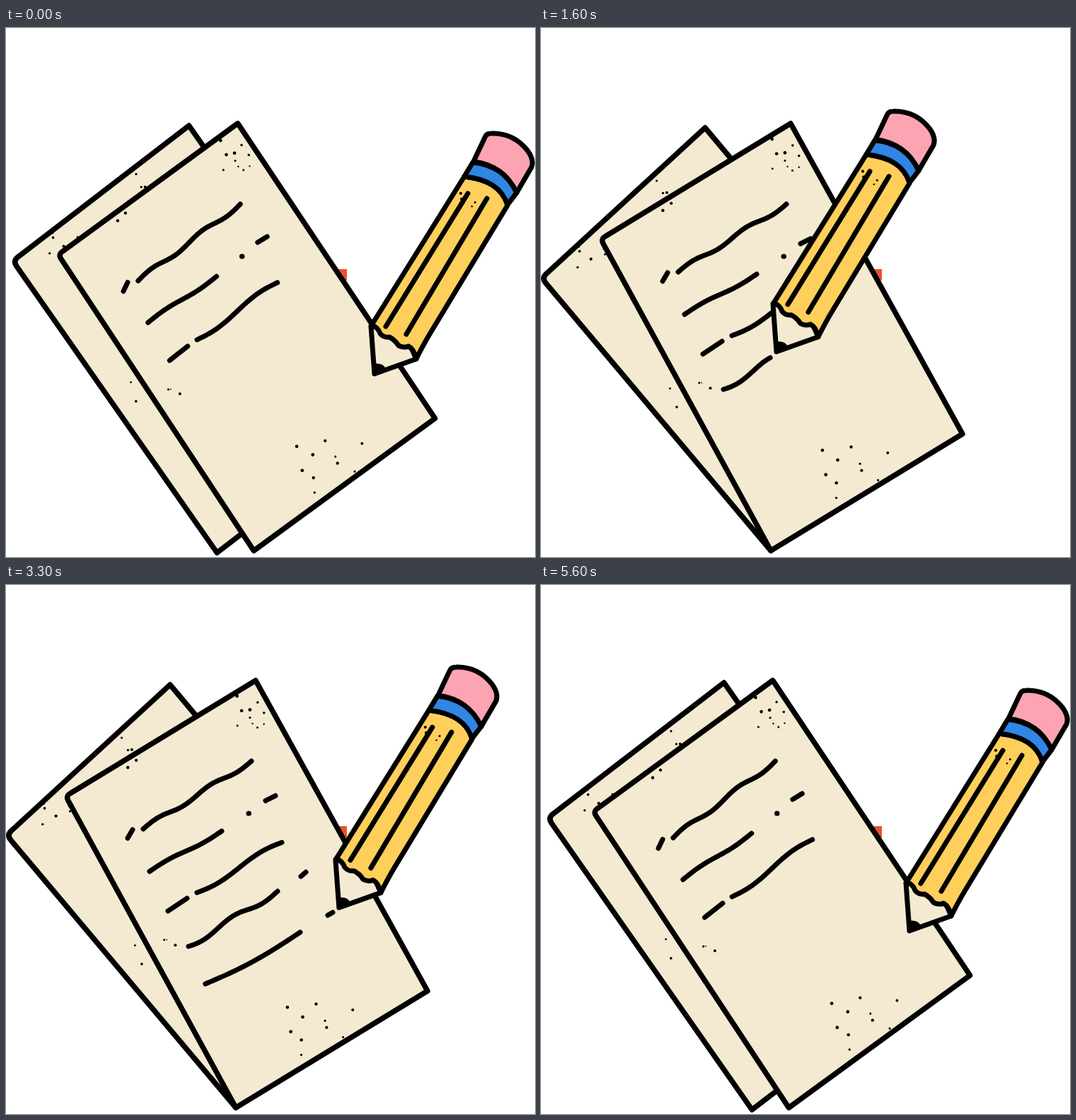
Recreate the animation shown at these times as an HTML page with a canvas. Size 748x748 px, loop 5730 ms.

```html
<!DOCTYPE html>
<html lang="en">
<head>
<meta charset="utf-8">
<title>Writing pencil</title>
<style>
html, body { margin: 0; width: 100%; height: 100%; overflow: hidden; background: #fff; }
canvas { display: block; }
</style>
</head>
<body>
<canvas id="stage" width="748" height="748"></canvas>
<script>
const ctx = document.getElementById('stage').getContext('2d');
const LOOP = 5730, STEP = 80;
const INK = '#000', PAPER = '#f4ead1', YELLOW = '#ffcf5c', PINK = '#fda4b2', BLUE = '#2f86e4';
const REST = { x: 521, y: 491 };

// The pencil tip eases from key to key; it writes on the way to each "writes" key
const KEYS = [
  { t: 0, ...REST },
  { t: 1000, x: 238.5, y: 518 },
  { t: 1055, x: 238.5, y: 518 },
  { t: 2155, x: 430, y: 400, writes: true },
  { t: 2660, x: 298, y: 570 },
  { t: 3250, x: 475, y: 454, writes: true },
  { t: 3570, x: 309, y: 621 },
  { t: 4330, ...REST, writes: true },
  { t: LOOP, ...REST }
];

// A handwritten line is a chord with a sine wobble
const line = (x0, y0, x1, y1, waves = 0, height = 0) => ({ x0, y0, x1, y1, waves, height });

const PRINTED = [
  line(172, 358, 179, 346), line(194, 345, 347, 249, 2, -3),
  line(343, 323, 343.5, 323), line(367, 305, 381, 298),
  line(203, 405, 305, 348, 1, -2),
  line(229, 461, 256, 443), line(270, 435, 390, 364, 1, 4)
];
const WRITTEN = [
  [line(258, 511, 384, 433, 1.5, 4), line(417, 412, 424, 406)],
  [line(282, 564, 416, 491, 0.5, 5), line(455, 467, 462, 463)],
  [line(321, 614, 440, 536, 1.5, -3), line(489, 516, 493, 514)]
];

function ease(t, start, end) {
  const p = Math.min(1, Math.max(0, (t - start) / (end - start)));
  return p * p * (3 - 2 * p);
}

function tipAt(t) {
  const i = KEYS.findIndex(key => key.t > t);
  const a = KEYS[i - 1], b = KEYS[i];
  const s = ease(t, a.t, b.t);
  return { x: a.x + (b.x - a.x) * s, y: a.y + (b.y - a.y) * s };
}

function strokeLine({ x0, y0, x1, y1, waves, height }, min = -Infinity, max = Infinity) {
  const count = 40;
  ctx.lineWidth = 7;
  ctx.beginPath();
  for (let i = 0; i <= count; i++) {
    const u = i / count;
    const x = x0 + (x1 - x0) * u;
    const y = y0 + (y1 - y0) * u + height * Math.sin(2 * Math.PI * waves * u);
    if (x >= min && x <= max) ctx.lineTo(x, y);
  }
  ctx.stroke();
}

function specks(x, y, width, height, count) {
  let seed = x * 31 + y;
  const random = () => (seed = (seed * 16807 + 11) % 2147483647) / 2147483647;
  random();
  ctx.fillStyle = INK;
  for (let i = 0; i < count; i++) {
    const px = x + width * (random() - 0.5);
    const py = y + height * (random() - 0.5);
    ctx.beginPath();
    ctx.arc(px, py, 0.9 + 1.6 * random(), 0, 2 * Math.PI);
    ctx.fill();
  }
}

function shape(path, fill, width = 7) {
  const p = new Path2D(path);
  ctx.lineWidth = width;
  if (fill) {
    ctx.fillStyle = fill;
    ctx.fill(p);
  }
  ctx.stroke(p);
}

function turned(x, y, degrees, draw) {
  ctx.save();
  ctx.translate(x, y);
  ctx.rotate(degrees * Math.PI / 180);
  ctx.translate(-x, -y);
  draw();
  ctx.restore();
}

function drawBack() {
  shape('M232 141L556 527L325 739L7 361Q1 354 7 348Z', PAPER, 7.5);
  specks(66, 328, 50, 50, 7);
  specks(163, 227, 30, 24, 3);
  specks(191, 525, 18, 36, 3);
}

function drawWriting(t, tipX) {
  const strokes = KEYS.flatMap((key, i) => key.writes ? [[KEYS[i - 1].t, key.t]] : []);
  WRITTEN.forEach((parts, row) => {
    const [start, end] = strokes[row];
    if (t < start) return;
    const left = parts[0].x0, right = parts[1].x1;
    const wiped = ease(t, 4610 + 255 * row, 5090 + 255 * row);
    const min = left + (right - left + 2) * wiped - 1;
    const max = t < end ? tipX - 6 - 4 * row : Infinity;
    parts.forEach(part => strokeLine(part, min, max));
  });
}

function drawFront(t, tipX) {
  shape('M353 135L596 574L325 739L88 305Q84 298 92 294Z', PAPER, 7.5);
  specks(344, 179, 46, 50, 10);
  specks(445, 630, 96, 84, 10);
  specks(226, 505, 28, 14, 3);
  specks(172, 252, 44, 24, 2);
  PRINTED.forEach(part => strokeLine(part));
  drawWriting(t, tipX);
}

function drawPencil(tip) {
  ctx.save();
  ctx.translate(tip.x - REST.x, tip.y - REST.y);
  shape('M516 421L521 489L580 468L570 445L530 424Z', PAPER);
  shape('M648 210L517 420Q526 423 529 432Q534 438 542 437Q550 441 555 449Q563 453 569 450Q577 454 580 468Q590 448 599 433L709 251Q703 217 648 210Z', YELLOW);
  shape('M661 189L677 155Q679 149 686 149Q718 148 738 174Q747 187 743 197L722 233Q704 194 661 189Z', PINK);
  shape('M660 190L648 210Q698 215 709 250L722 233Q704 194 660 190Z', BLUE);
  shape('M653 234L537 422M680 241L566 433');
  shape('M521 488L520 477Q531 475 535 482Z', INK, 4);
  specks(658, 240, 30, 50, 4);
  ctx.restore();
}

function draw(t) {
  const tip = tipAt(t);
  const closed = 1 - ease(t, 0, 1000) + ease(t, 4160, 5160);
  ctx.fillStyle = '#fff';
  ctx.fillRect(0, 0, 748, 748);
  ctx.fillStyle = '#e9522d';
  ctx.fillRect(466, 341, 16, 16);
  ctx.strokeStyle = INK;
  ctx.lineCap = ctx.lineJoin = 'round';
  turned(278.5, 440.5, 5.1 * closed, drawBack);
  turned(339, 436.5, -4.8 * closed, () => drawFront(t, tip.x));
  drawPencil(tip);
}

function tick() {
  const t = performance.now() % LOOP;
  draw(Math.floor((t + 5) / STEP) * STEP);
  requestAnimationFrame(tick);
}
tick();
</script>
</body>
</html>
```
